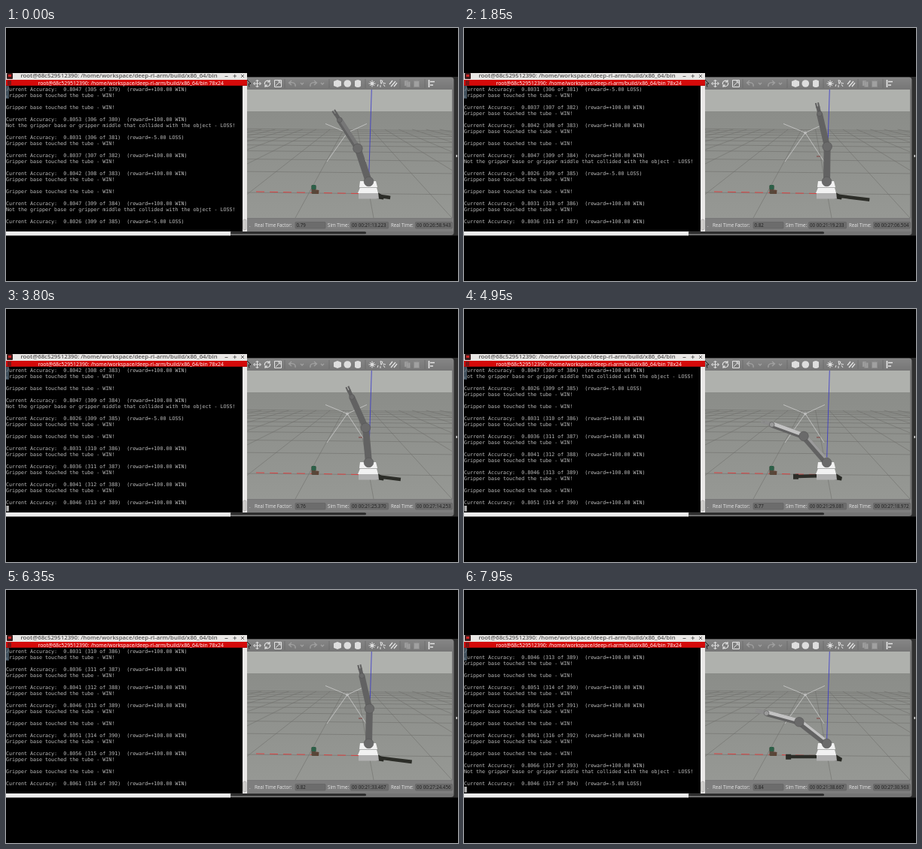
An HTML page that plays this animation: 600 px wide and 337 px high, repeating every 8000 ms.

```html
<!DOCTYPE html>
<html lang="en">
<head>
<meta charset="utf-8">
<title>Robot arm training</title>
<style>
html, body { margin: 0; width: 100%; height: 100%; overflow: hidden; background: #000; }
svg { display: block; width: 100vw; height: 100vh; }
text { white-space: pre; }
#log text { font: 6.66px "DejaVu Sans Mono", monospace; fill: #bdbdbd; }
.ui { font: 6.2px "Open Sans", "Noto Sans", sans-serif; }
</style>
</head>
<body>
<svg id="stage" viewBox="0 0 600 337">
  <defs>
    <clipPath id="viewClip"><rect x="320" y="82" width="272" height="171"/></clipPath>
    <clipPath id="termClip"><rect x="0" y="77" width="314" height="194"/></clipPath>
    <clipPath id="titleClip"><rect y="60" width="320" height="9"/></clipPath>
    <linearGradient id="bar" x2="0" y2="1"><stop stop-color="#868686"/><stop offset="1" stop-color="#767676"/></linearGradient>
    <linearGradient id="floor" x2="0" y2="1"><stop stop-color="#8b8d89"/><stop offset="1" stop-color="#969894"/></linearGradient>
  </defs>
  <rect width="600" height="337"/>

  <rect x="296" y="65" width="304" height="211.500" fill="#303030"/>
  <rect x="296" y="65.500" width="298.500" height="210.500" rx="4" fill="#757575"/>
  <rect x="318" y="66" width="276" height="16" rx="3" fill="url(#bar)"/>
  <rect x="597.500" y="169" width="1.500" height="3" fill="#ddd"/>
  <g id="tools" fill="none" stroke="#e4e4e4"></g>

  <g clip-path="url(#viewClip)">
    <rect x="320" y="82" width="272" height="30" fill="#afb1ad"/>
    <rect x="320" y="111" width="272" height="142" fill="url(#floor)"/>
    <path id="grid" fill="none" stroke="#6c6d6a" stroke-width=".55"/>
    <path d="M485.300 82L481.500 204" stroke="#3434cc" stroke-width=".8"/>
    <path d="M332 218L468 220.500" stroke="#e23a3a" stroke-width=".9" stroke-dasharray="11 7"/>
    <path d="M424 127.500L453 139.500L479 127.500M426 178L453 139.500L478 178" fill="none" stroke="#dcdcdc" stroke-width=".65"/>
    <circle cx="453" cy="139.500" r="1.500" fill="none" stroke="#ddd" stroke-width=".5"/>
    <path d="M468 171h5" stroke="#7c2a2a" stroke-width=".8"/>
    <path d="M408 219L412 215.500L415.500 216L415 221H407Z" fill="#5d4436"/>
    <rect x="405.500" y="209" width="6" height="12" rx="1.500" fill="#57483a"/>
    <rect x="405.500" y="209" width="6" height="6" rx="1.500" fill="#2c6048"/>
    <path d="M490 217L502 224L501 228.500L491 227Z" fill="#292a25"/>
    <path id="shade" fill="none" stroke="#2c2d28" stroke-linejoin="round" stroke-width="4.600"/>
    <path d="M468 219H494L495 227.500H468Z" fill="#b2b2b2"/>
    <path d="M470 212.500H492L494 220H467Z" fill="#f2f2f2"/>
    <path d="M470 204H491L493 212H469Z" fill="#f2f2f2"/>
    <path d="M469 212.500H493" stroke="#a6a6a6" stroke-width=".8"/>
    <g id="arm" fill="none"></g>
  </g>

  <rect x="318" y="253.500" width="276" height="17.500" fill="#7e7e7e"/>
  <g class="ui" id="status" fill="#e6e6e6"></g>
  <rect x="298" y="271.300" width="180" height="3" rx="1.500" fill="#2a2a2a"/>
  <rect y="271" width="298" height="5.500" fill="#ececec"/>

  <rect y="60" width="320" height="211" fill="#000"/>
  <rect y="60" width="320" height="9" fill="#e9e7e5"/>
  <rect x="1" y="60" width="8" height="8" rx="1" fill="#3a1b1b"/>
  <rect x="3" y="62" width="4" height="3" fill="#c22"/>
  <g clip-path="url(#titleClip)">
    <text x="150" y="65.700" text-anchor="middle" font-family="Open Sans, Noto Sans, sans-serif" font-weight="600" font-size="7.800" fill="#505050" id="title"></text>
  </g>
  <path d="M290.500 64.500h4M301.500 64h4.500M303.700 61.800v4.500M312 62l4 4M316 62l-4 4" stroke="#555" stroke-width=".9"/>
  <rect y="69" width="320" height="7.800" fill="#d40a0a"/>
  <rect x="2" y="70" width="5" height="6" fill="#7b1515"/>
  <text class="ui" x="165.700" y="75.500" text-anchor="middle" fill="#fff" style="font-size:6.9px" id="tab"></text>
  <g id="log" clip-path="url(#termClip)"></g>
  <rect y="77" width="4" height="17" fill="#41505c"/>
  <path d="M1 84l3-5M1 90v3" stroke="#6b7b86"/>
  <rect x="314" y="77" width="6" height="194" fill="#ebe9e8"/>
  <rect x="314.900" y="255" width="4" height="14" rx="1.800" fill="#d2d0ce" stroke="#989898" stroke-width=".6"/>
  <rect id="cursor" x=".4" y="262" width="3.400" height="7.600" fill="#b4b4b4"/>
</svg>
<script>
const LOOP = 8000, STEP = 50;
const $ = id => document.getElementById(id);
function add(parent, tag, attrs, text) {
  const el = document.createElementNS("http://www.w3.org/2000/svg", tag);
  for (const k in attrs) el.setAttribute(k, attrs[k]);
  if (text) el.textContent = text;
  return parent.appendChild(el);
}
// Piecewise linear lookup: xs ascending
function lerpAt(xs, ys, x) {
  let i = 1;
  while (i < xs.length - 1 && x > xs[i]) i++;
  const f = (x - xs[i - 1]) / (xs[i] - xs[i - 1]);
  return ys[i - 1] + (ys[i] - ys[i - 1]) * f;
}

const path = "root@68c529512390: /home/workspace/deep-rl-arm/build/x86_64/bin";
$("title").textContent = path;
$("tab").textContent = path + " 78x24";

// Toolbar
const icon = (d, attrs = {}) => add($("tools"), "path", { d, ...attrs });
const dim = { stroke: "#a0a0a0", "stroke-width": 1.3 };
const solid = { fill: "#dedede", stroke: "none" };
icon("M320 69l5 5l-3 .5l1 4", { stroke: "#222" });
icon("M329 74h9M333.500 69.500v9M331.500 71l2-2l2 2M331.500 77l2 2l2-2M330.500 72l-2 2l2 2M336.500 72l2 2l-2 2");
icon("M343.500 75a3.800 3.800 0 0 1 6-4M350.500 73a3.800 3.800 0 0 1-6 4M350 69v3h-3M344 79v-3h3", { "stroke-width": 1.1 });
icon("M356.500 69.500h9v9h-9zM358 77l6-6M361 71h3v3");
icon("M384 78c1-5-3-6-8-5M379 70l-3.500 3l3.500 3", dim);
icon("M404 78c-1-5 3-6 8-5M409 70l3.500 3l-3.500 3", dim);
icon("M391 73l2 2l2-2M418 73l2 2l2-2", dim);
icon("M435 71l5-2l5 2v6l-5 2l-5-2z", solid);
icon("M448.500 74a4.800 4.800 0 1 0 9.600 0a4.800 4.800 0 1 0-9.600 0", solid);
icon("M463 70.500q4-3 8 0v7q-4 3-8 0z", solid);
icon("M481.500 74h9M486 69.500v9M483 71l6 6M489 71l-6 6");
icon("M484 74a2 2 0 1 0 4 0a2 2 0 1 0-4 0", solid);
icon("M497 69.500l3 1l-2 4zM497 76v3M501 75l2 3M494 75l-1 3M500 73l4 1");
icon("M509 75l4-5M511 78l6-7M515 78l4-5", { "stroke-width": 1.3 });
icon("M529 70h5v7h-5zM531.500 71.500h5v7h-5z", { fill: "#a0a0a0", stroke: "#8c8c8c", "stroke-width": .6 });
icon("M541.500 70.500h7v8h-7zM543.500 70h3", { fill: "#a0a0a0", stroke: "#8c8c8c" });
icon("M561.500 69v10M563 71.500h6M563 76h4", { "stroke-width": 1.7 });
for (const x of [370, 429, 477, 523, 556]) icon(`M${x} 68v12`, { stroke: "#686868", "stroke-width": .7 });

// Ground grid
let lines = "";
for (let k = 0; k <= 10; k++) {
  const y = 110.500 + 323 / (2.94 + k);
  lines += `M300 ${y - 1.5}L600 ${y + 1.5}`;
}
for (let k = -10; k <= 10; k++) {
  const x = y => 462 + (20 + k * 80) * (y - 110) / 110;
  lines += `M${x(135)} 135L${x(260)} 260`;
}
$("grid").setAttribute("d", lines);

// Status bar
const status = $("status");
function field(label, x, boxX, w) {
  add(status, "text", { x, y: 264.700 }, label);
  add(status, "rect", { x: boxX, y: 258.500, width: w, height: 8.500, rx: 1, fill: "#6c6c6c", stroke: "#606060", "stroke-width": .6 });
  return add(status, "text", { x: boxX + 1.500, y: 264.700, fill: "#1d1d1d" });
}
add(status, "text", { x: 323, y: 264.700 }, ".");
const factor = field("Real Time Factor:", 330, 384, 40);
const simClock = field("Sim Time:", 427, 457.500, 50);
const realClock = field("Real Time:", 511, 543.500, 49);
const clock = s => `00 00:${Math.floor(s / 60)}:${(s % 60).toFixed(3).padStart(6, "0")}`;
const marks = [0, 1850, 2850, 3800, 4950, 6350, 7950];
const simSecs = [1273.223, 1279.233, 1282.434, 1285.370, 1289.081, 1293.467, 1298.667];
const realSecs = [1618.943, 1626.504, 1630.478, 1634.253, 1638.972, 1644.456, 1650.963];
const factors = [.79, .82, .79, .76, .77, .82, .84];

// Terminal log: W = win, D = win with two touches, L = loss
const touch = "Gripper base touched the tube - WIN!";
const crash = "Not the gripper base or gripper middle that collided with the object - LOSS!";
const log = [], lengths = [];
let wins = 304;
[..."WDLWWDLDWWWDWDDL"].forEach((kind, i) => {
  const total = 379 + i, won = kind !== "L";
  if (won) wins++;
  log.push(won ? touch : crash, "");
  if (kind === "D") log.push(touch, "");
  log.push(`Current Accuracy:  ${(wins / total).toFixed(4)} (${wins} of ${total})  (reward=${won ? "+100.00 WIN" : "-5.00 LOSS"})`);
  lengths.push(log.length);
});
const rows = Array.from({ length: 23 }, (_, i) => add($("log"), "text", { x: 0, y: 83.600 + i * 8 }));

// Episode starts; the first seven are already in the log
const starts = [-300, 800, 1840, 2800, 3650, 4500, 5400, 6345, 7000, 7400, 8200];

// Arm pose over one episode
const phase = [0, .06, .176, .27, .5, .69, 1];
const upper = [-2, 5, 5, 18, 41, 52, 63];
const fore = [12.5, 16, 24, 32, 70, 75, 98];
const shadeX = [540, 530, 524, 511, 437, 427, 415];
const shadeY = [229, 228, 227, 226, 223, 222, 222];

const arm = $("arm");
const piece = (stroke, width) => add(arm, "path", { stroke, "stroke-width": width });
const palm = piece("#606060", 5);
const fingers = piece("#606060", 2);
const parts = [[9, 3.500], [8, 4.800]].map(([w, hi]) => ({ w, hi, body: piece("#626262", w), top: piece("#c2c2c2", hi) }));
const disc = r => add(arm, "circle", { r, stroke: "#555", "stroke-width": .6 });
const joints = [disc(6.300), disc(6.300), disc(3.400)];

const along = ([x, y], deg, len, side = 0) => {
  const a = deg * Math.PI / 180, s = Math.sin(a), c = Math.cos(a);
  return [x - s * len + c * side, y - c * len - s * side];
};
const seg = (a, b) => `M${a}L${b}`;

function drawArm(p) {
  const a = lerpAt(phase, upper, p), b = lerpAt(phase, fore, p);
  const base = [481.500, 204.500], elbow = along(base, a, 46.500), wrist = along(elbow, b, 45);
  const lit = b > 50;
  [[base, elbow, a], [elbow, wrist, b]].forEach(([from, to, deg], i) => {
    const { w, hi, body, top } = parts[i], side = w / 2 - hi / 2;
    body.setAttribute("d", seg(from, to));
    top.setAttribute("d", seg(along(from, deg, 0, side), along(to, deg, 0, side)));
    top.setAttribute("opacity", Math.max(0, Math.min(1, (deg - 28) / 22)));
  });
  const finger = s => seg(along(wrist, b, 8, s), along(wrist, b, 15, s));
  palm.setAttribute("d", seg(wrist, along(wrist, b, 10)));
  fingers.setAttribute("d", finger(-1.700) + finger(1.500));
  for (const el of [palm, fingers]) el.setAttribute("stroke", lit ? "#8c8c8c" : "#606060");
  [base, elbow, wrist].forEach((q, i) => {
    joints[i].setAttribute("cx", q[0]);
    joints[i].setAttribute("cy", q[1]);
    joints[i].setAttribute("fill", i === 2 && lit ? "#9a9a9a" : "#6a6a6a");
  });
  const x = lerpAt(phase, shadeX, p), y = lerpAt(phase, shadeY, p);
  const tip = x < 480 ? `M${x} ${y - 1}h7M${x} ${y + 1.5}h7M${x + 6} ${y}` : `M${x} ${y}`;
  $("shade").setAttribute("d", `${tip}L${(x + 484) / 2} ${(y + 222) / 2}L484 222`);
}

function draw(t) {
  let n = 0;
  while (starts[n + 1] <= t) n++;
  drawArm((t - starts[n]) / (starts[n + 1] - starts[n]));
  const end = lengths[6 + n];
  rows.forEach((row, i) => { row.textContent = log[end - 23 + i] || ""; });
  const real = lerpAt(marks, realSecs, t);
  factor.textContent = lerpAt(marks, factors, t).toFixed(2);
  simClock.textContent = clock(lerpAt(marks, simSecs, t));
  realClock.textContent = clock(real);
  $("cursor").setAttribute("visibility", real % 1.2 >= .6 ? "visible" : "hidden");
}

const t0 = performance.now();
function tick() {
  const t = (performance.now() - t0) % LOOP;
  draw(Math.floor(t / STEP) * STEP);
  requestAnimationFrame(tick);
}
tick();
</script>
</body>
</html>
```
